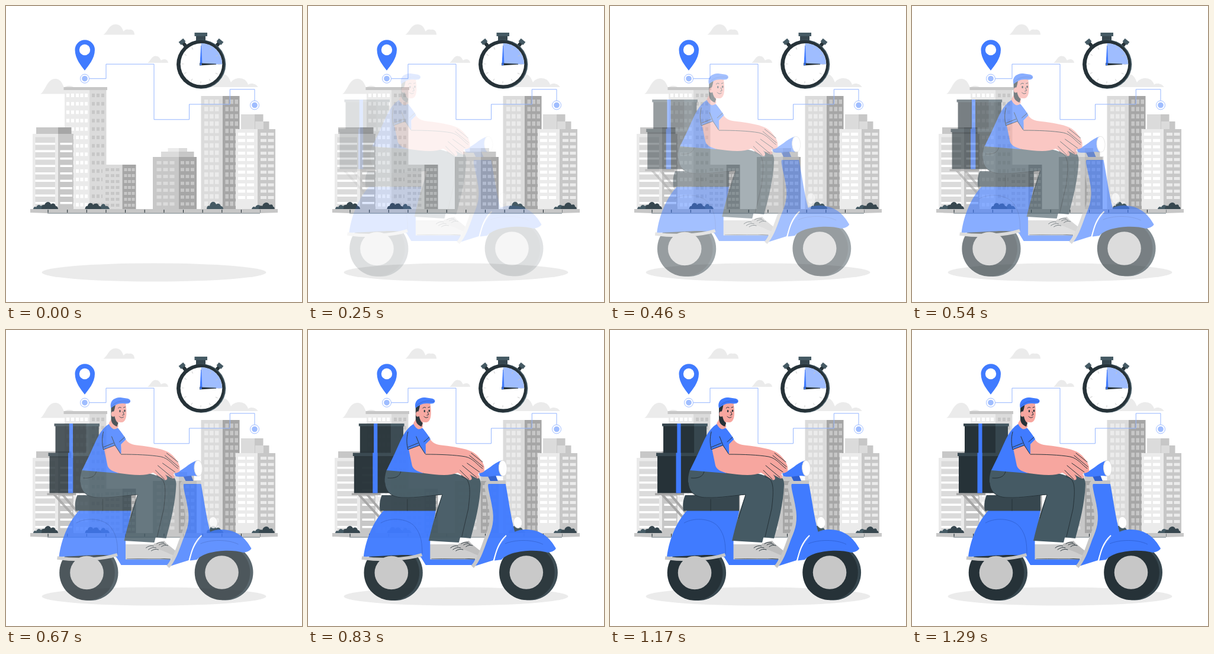
An HTML page that plays this animation: 500x500 px, repeating every 1330 ms.

```html
<!DOCTYPE html>
<html lang="en">
<head>
<meta charset="utf-8">
<title>Scooter delivery</title>
<style>
html, body { margin: 0; height: 100%; overflow: hidden; background: #fff; }
svg { display: block; width: 100vw; height: 100vh; }
.ink { fill: none; stroke: #263238; stroke-width: 1; stroke-linecap: round; stroke-linejoin: round; }
</style>
</head>
<body>
<svg viewBox="0 0 500 500">
  <g fill="#ebebeb">
    <path d="M164.500 48.500C171 45 174 31 185 31C193 31 196 36 198.500 43C201 39 205 39 208 40C214 39 217 43 217 48.500Z"/>
    <path d="M239 96C244 93 246 84.500 252.500 84.500C258 84.500 260 88 262 92C264 89.500 273 88 274 96Z"/>
    <path d="M58 148.500C66 145 69 123 83 123C92 123 95 130 98 138C102 133 118 132 122 148.500Z"/>
    <path d="M342 137C351 134 353 115 366 115C374 115 377 122 380 129C385 120 405 118 409 133C413 129 423 131 425.500 137Z"/>
    <ellipse cx="250" cy="450" rx="189.500" ry="15.500"/>
  </g>

  <g id="city"></g>

  <path d="M41 343H459V349L429 350H70L41 349Z" fill="#c7c7c7"/>
  <path d="M70 350.200H429" stroke="#455a64" stroke-width=".7"/>
  <path d="M70.500 346.500H430" stroke="#263238" stroke-width="5" stroke-dasharray="1.100 31.540"/>
  <g fill="#455a64">
    <path d="M46 343C47 339 49 338 51 340C53 335 57 335 59 338C63 334 66 338 67 343Z"/>
    <path d="M153 343C153 338 158 337 160 339C161 334 167 332 168 338C172 337 174 340 175 343Z"/>
    <path d="M339 343C339 338 342 336 344 338C345 329 353 329 355 335C359 332 362 335 363 338C366 338 367 341 367 343Z"/>
    <path d="M415 343C416 339 419 338 421 340C423 335 428 335 430 338L435 343Z"/>
  </g>
  <g fill="#37474f">
    <path d="M60 343C60 337 63 335 65 336C67 330 74 329 76 335C80 332 83 334 84 338C87 338 88 341 88 343Z"/>
    <path d="M133.500 343C134 338 137 337 138 338C139 331 146 332 147 336C151 332 156 333 157 338C160 338 161 341 161 343Z"/>
    <path d="M427 343C427 338 431 336 433 338C435 331 443 330 445 336C449 334 451 336 451 339C453 339 454 341 453.500 343Z"/>
  </g>

  <path d="M133 122.700H169V98.200H250V191.800H309.500V166H378.300V140.800H420V167.500" fill="none" stroke="#94b5ff"/>
  <g fill="#fff" stroke="#9fbdff">
    <circle cx="133" cy="122.700" r="7.500"/><circle cx="420" cy="167.500" r="7.500"/>
  </g>
  <g fill="#9fbdff"><circle cx="133" cy="122.700" r="4.800"/><circle cx="420" cy="167.500" r="4.800"/></g>
  <path d="M133 109C127 101 116.500 89 116.500 74A16.700 16.700 0 0 1 150 74C150 89 139 101 133 109Z" fill="#407bff"/>
  <circle cx="133" cy="74" r="9.200" fill="#fff"/>

  <g id="watch">
    <path d="M321 50H337V60H321Z" fill="#37474f"/>
    <path d="M318.500 45H340V51H318.500Z" fill="#455a64"/>
    <g id="button" transform="rotate(-40 329.500 98.500)">
      <path d="M326.500 50H332.500V59H326.500Z" fill="#263238"/>
      <path d="M324.500 45.500H334.500V52H324.500Z" fill="#455a64"/>
    </g>
    <use href="#button" transform="rotate(80 329.500 98.500)"/>
    <circle cx="330" cy="98.500" r="41.300" fill="#455a64"/>
    <circle cx="328.800" cy="98.500" r="40.700" fill="#263238"/>
    <circle cx="330" cy="98.300" r="35.300" fill="#fff"/>
    <path d="M329.500 98.500V63A35 35 0 0 1 365 98.500Z" fill="#9fbdff"/>
    <circle cx="329.500" cy="98.500" r="30.500" fill="none" stroke="#c7c7c7" stroke-width="4" stroke-dasharray=".8 15.170"/>
    <path d="M329.200 67H330L331.500 99H327.500Z" fill="#407bff"/>
    <path d="M327 96.500L355 97.700V98.700L327 100.500Z" fill="#263238"/>
    <circle cx="329" cy="98.500" r="1.700" fill="#407bff"/>
  </g>

  <g id="rider">
    <path d="M87 278L127 322M101 278L130 312" stroke="#a6a6a6" stroke-width="4"/>
    <path d="M75 275.500H124V279H75Z" fill="#a6a6a6"/>
    <path d="M89 162H162V208H89ZM79 212H152V275.500H79Z" fill="#263238"/>
    <path d="M87 158H163.500V162.500H87ZM77 207.500H152V213H77ZM141 162H162V208H141Z" fill="#37474f"/>
    <path d="M141 158H163.500V162.500H141Z" fill="#455a64"/>
    <path d="M112.300 158H118.500V208H112.300ZM110.500 207.500H118.800V275.500H110.500Z" fill="#407bff"/>

    <g fill="#37474f"><circle cx="148" cy="410" r="47"/><circle cx="376" cy="409.500" r="47"/></g>
    <g fill="#263238"><circle cx="142.500" cy="410" r="46.800"/><circle cx="371" cy="409.500" r="46.800"/></g>
    <g fill="#c7c7c7"><circle cx="142" cy="410" r="28.300"/><circle cx="370" cy="409.500" r="28.300"/></g>

    <path d="M207 362H268L293 380L281 389H207Z" fill="#cecece"/>
    <path d="M129 305H217L207.500 357V387.500H284L279 397H200L192 384C177 376 140 382 95 383C99 352 112 323 129 305Z" fill="#407bff"/>
    <path d="M124 326C143 315 173 319 183 334C193 347 194 362 194 378" fill="none" stroke="#2e5fd0" stroke-width=".8"/>
    <path d="M92 385C122 389 164 389 193.500 379.500" fill="none" stroke="#c7c7c7" stroke-width="5.500"/>
    <path d="M126 279H217V305.500H123C121 295 123 285 126 279Z" fill="#37474f"/>
    <path class="ink" d="M169 286V305M210 386C235 387 260 385 283 387"/>

    <path d="M255 361L273 356C279 364 290 370 295 376L291 382C279 377 269 371 257 369Z" fill="#bdbdbd"/>
    <path d="M232 362H250C258 370 274 376 284 381L283 386H209V363Z" fill="#cecece"/>
    <path class="ink" d="M242 368Q248 363 255 365M246 371Q252 366 259 368M251 373Q256 369 263 371M260 361Q266 357 272 359M264 363Q270 359 275 362M268 366Q273 362 279 364" stroke-width="1.500"/>

    <path d="M304 260H335C340 286 344 318 351 343C329 348 320 370 314 389L279 400C291 386 296 368 302 352C309 336 314 322 309 298C307 282 304 270 304 260Z" fill="#407bff"/>
    <path d="M335 257H306C298 258 305 275 309 298C314 322 309 336 302 352C296 368 291 386 279 400" fill="none" stroke="#c7c7c7" stroke-width="6"/>
    <path d="M316 389.500C320 361 341 337 369 337C395 337 410 351 420 369C418 373 412 375 407 376C383 369 340 373 328 388Z" fill="#407bff"/>
    <path d="M336 347C323 359 319 373 315 390" fill="none" stroke="#fff" stroke-width="2"/>
    <path d="M334 361C350 354 380 353 398 362" fill="none" stroke="#2e5fd0" stroke-width=".8"/>
    <ellipse cx="355.500" cy="325" rx="7.300" ry="9.700" fill="#fff" stroke="#dbdbdb" transform="rotate(-8 355.500 325)"/>

    <path d="M260 240C279 244 293 244 293 260C292 293 283 326 276 352L257 350Z" fill="#455a64"/>
    <path d="M134 236C127 257 131 279 155 283C181 286 207 280 228 278C218 304 211 331 205 356L256 359C263 331 272 304 275 270C276 251 263 245 245 242L193 239Z" fill="#455a64"/>
    <path class="ink" d="M131 258C132 274 143 283 162 283C185 284 211 279 228 278L216 318M158 239C156 248 148 251 136 250M261 248C278 250 275 275 272 302L261 349"/>

    <path d="M179 159C165 168 160 182 152 199C146 213 139 226 134 237L195 242L201 210L200 192L208 184C203 177 198 170 190 161Z" fill="#407bff"/>
    <path d="M179 158L185 147L195 154L195 164C190 171 183 167 179 158Z" fill="#f7a69f"/>
    <path d="M186 128C191 123 200 122 207.500 123C210 140 210 155 201 156C192 157 188 150 186 143Z" fill="#f7a69f"/>
    <path d="M183 127L191 123C190 129 189 135 187 139L189 146C190 151 192 155 195 157L193 163C187 161 183 157 183 149Z" fill="#263238"/>
    <ellipse cx="186.500" cy="142" rx="3.200" ry="4.500" fill="#f7a69f"/>
    <path d="M183 132C180 122 186 114 199 114L209 115.500C214 116 217 119 215 122C213 125 208 124.500 203 124C195 123.500 189 127 183 132Z" fill="#407bff"/>
    <path d="M184 129C190 121 202 118 215 121" fill="none" stroke="#2e5fd0" stroke-width=".8"/>
    <path class="ink" d="M195 132Q197 129 200 131M204 131L207 130M203 138L205 143L202 144M197 146Q200 150 204 147"/>
    <g fill="#263238"><ellipse cx="198" cy="137" rx="1.300" ry="1.900"/><ellipse cx="206" cy="136.500" rx="1.300" ry="1.900"/></g>

    <path d="M304 245H318L322 255H309Z" fill="#2e5fd0"/>
    <path d="M290 242C305 238 313 225 329 220V247C317 244 307 250 292 247Z" fill="#407bff"/>
    <ellipse cx="330.500" cy="233.500" rx="7" ry="13.300" fill="#fff" stroke="#dbdbdb" transform="rotate(-3 330.500 233.500)"/>

    <path d="M200 193L208 185C213 192 219 194 230 195C248 197 266 200 277 205C286 209 296 220 299 231L299 239L292 242L268 219L200 210Z" fill="#f7a69f"/>
    <path d="M171 200L189 195L199 209C224 211 250 210 268 215C281 221 289 231 297 237C298 241 294 242 291 240L288 244C293 250 289 252 285 250L274 244C281 251 277 255 273 253L254 241C239 248 215 244 198 242C188 240 179 236 177 229Z" fill="#f7a69f"/>
    <path class="ink" d="M200 210C224 210 250 211 267 214C281 217 287 228 296 234M277 208L296 223M274 212L297 231M262 229L286 249M258 237L273 252M270 225L291 240"/>
    <path d="M169 174C167 184 167 193 170 202L190 195L200 193L208 185C204 177 199 171 195 166Z" fill="#407bff"/>
    <path class="ink" d="M170 172C167 184 168 193 170 202L189 195M170 198L187 191M184 180L190 195L199 209M197 189L206 181" stroke-width=".7"/>
  </g>
</svg>
<script>
const rect = (color, x, y, w, h) => `<rect x="${x}" y="${y}" width="${w}" height="${h}" fill="${color}"/>`;
// Rows of windows under each column position in xs.
const windows = (color, xs, w, y, pitch, h, rows) => xs.map(x =>
  Array.from({ length: rows }, (_, i) => rect(color, x, y + i * pitch, w, h)).join('')).join('');
// Two faces of a block meeting at the edge x = mid.
const block = (x, mid, right, y, bottom, light, dark) =>
  rect(light, x, y, mid - x, bottom - y) + rect(dark, mid, y, right - mid, bottom - y);

const white = '#fff', pale = '#ebebeb', light = '#dbdbdb', mid = '#c7c7c7', dark = '#a6a6a6';
document.getElementById('city').innerHTML = [
  block(99, 141, 169.5, 141, 343, pale, light),
  rect(mid, 97.5, 137, 73.5, 5),
  windows(white, [102, 110, 118, 125.5, 133], 5, 148, 14.2, 6, 14),
  windows(mid, [145, 153, 161], 5, 148, 14.2, 6, 14),

  block(51, 88, 110.5, 205, 216, mid, dark),
  block(45, 88, 114, 216, 343, pale, mid),
  windows(light, [49.5], 33.5, 221.5, 12.5, 9.5, 10),
  windows(white, [49.5], 33.5, 231, 12.5, 3.5, 9),
  windows(white, [91.5], 20.5, 231, 12.5, 3.5, 9),

  block(163, 196.5, 219.5, 268, 343, light, dark),
  windows(mid, [168, 177, 185.5], 6, 274, 10, 5, 7),
  windows(mid, [199.5, 206, 212.5], 5, 274, 10, 5, 7),

  block(273.5, 292, 306, 240, 246, pale, light),
  block(262, 292, 317.5, 246, 255, light, mid),
  block(248, 292, 322, 255, 343, mid, dark),
  windows(light, [254.5, 265.5, 276.5], 8, 262, 11.6, 5.5, 7),
  windows(mid, [295, 303.5, 312], 6, 262, 11.6, 5.5, 7),

  block(329.5, 366, 394.5, 152, 343, light, dark),
  windows(pale, [335, 344, 353], 6.5, 158, 12.3, 7.5, 15),
  windows(mid, [370.5, 378.5, 386.5], 5.5, 158, 12.3, 7.5, 15),

  block(397, 420, 434.5, 183, 208, light, mid),
  block(421, 435, 444.5, 195, 208, light, mid),
  block(388, 425, 455, 208, 343, pale, mid),
  windows(white, [392, 407], 12, 214, 10.7, 5, 11),
  windows(pale, [430, 442.5], 10, 214, 10.7, 5, 11)
].join('');

// Slide-in easing with overshoot: cubic-bezier(.36, -.01, .5, 1.38).
const bezier = (s, a, b) => 3 * a * s * (1 - s) ** 2 + 3 * b * s * s * (1 - s) + s ** 3;
function ease(x) {
  let lo = 0, hi = 1;
  for (let i = 0; i < 24; i++) {
    const s = (lo + hi) / 2;
    if (bezier(s, .36, .5) < x) lo = s; else hi = s;
  }
  return bezier(lo, -.01, 1.38);
}

const LOOP = 1330, FPS = 24, SLIDE = 1235;
const rider = document.getElementById('rider');
function draw() {
  const step = Math.floor(performance.now() % LOOP * FPS / 1000 + .05);
  const e = step < 3 ? 0 : ease(Math.min(1, step / FPS * 1000 / SLIDE));
  rider.setAttribute('opacity', Math.max(0, Math.min(1, e)));
  rider.setAttribute('transform', `translate(${30 * (e - 1)})`);
  requestAnimationFrame(draw);
}
draw();
</script>
</body>
</html>
```
